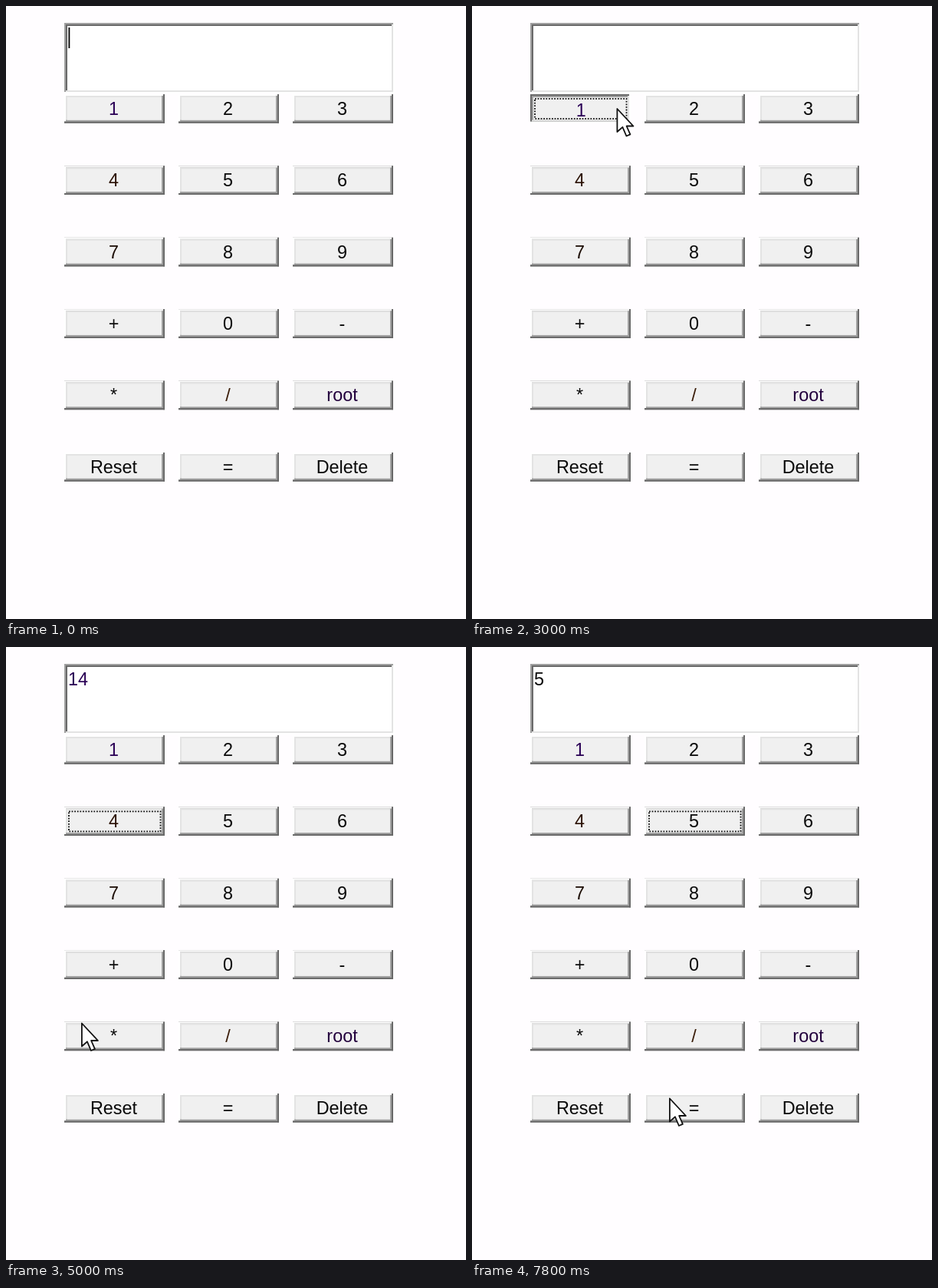
Animation of 600x799 px, one loop 8 s. Source, as an HTML page:

```html
<!DOCTYPE html>
<html lang="en">
<head>
<meta charset="utf-8">
<title>Calculator</title>
<style>
  html, body { margin: 0; width: 100%; height: 100%; overflow: hidden; background: #fffdff; }
  svg { display: block; width: 100%; height: 100%; }
  text { font: 23.4px "Liberation Sans", Arial, sans-serif; fill: #0a0a0a; }
  .key text { text-anchor: middle; }
  .white { fill: #fff; }
  .light { fill: #e3e3e3; }
  .mid { fill: #a0a0a0; }
  .dark { fill: #696969; }
  .face { fill: #f0f0f0; }
  .ring { fill: none; stroke: #111; stroke-width: 1.8; stroke-dasharray: 1.8; visibility: hidden; }
  .focus .ring { visibility: visible; }
  .sunken, .pressed .raised { display: none; }
  .pressed .sunken { display: inline; }
  .pressed text { transform: translate(1.8px, 1.8px); }
</style>
</head>
<body>
<svg viewBox="0 0 600 799">
  <g id="field"></g>
  <rect id="caret" x="81.5" y="28" width="1.8" height="27"/>
  <text id="display" x="81" y="50"></text>
  <g id="keys"></g>
  <path id="pointer" d="M0 0V30L7 23.8L12 35.5L17 33.4L12.2 22.5H21Z"
        fill="#fff" stroke="#111" stroke-width="1.8" stroke-linejoin="round"/>
</svg>
<script>
const LOOP = 8000, STEP = 200;
const LABELS = ['1', '2', '3', '4', '5', '6', '7', '8', '9',
  '+', '0', '-', '*', '/', 'root', 'Reset', '=', 'Delete'];
const TINTS = { 1: '#2a0055', 4: '#2b1206', 7: '#1c0d05', '/': '#3a1c08', root: '#22003c' };

const $ = id => document.getElementById(id);

const rect = (cls, x, y, w, h) =>
  `<rect class="${cls}" x="${x}" y="${y}" width="${w}" height="${h}"/>`;

// Two-pixel outer and inner edges around a face.
function bevel(w, h, [outerTop, innerTop, innerEnd, outerEnd], face) {
  return rect(outerEnd, 0, 0, w, h) +
    rect(outerTop, 0, 0, w - 2, h - 2) +
    rect(innerEnd, 2, 2, w - 4, h - 4) +
    rect(innerTop, 2, 2, w - 6, h - 6) +
    rect(face, 4, 4, w - 8, h - 8);
}

function keyMarkup(label, i) {
  const x = 76 + (i % 3) * 149;
  const y = 115 + Math.floor(i / 3) * 93.4;
  return `<g class="key" transform="translate(${x} ${y.toFixed(1)})">
    <g class="raised">${bevel(131, 37.6, ['white', 'light', 'mid', 'dark'], 'face')}
      ${rect('dark', 0, 35.6, 131, 2)}${rect('dark', 129, 0, 2, 37.6)}</g>
    <g class="sunken">${bevel(131, 37.6, ['dark', 'mid', 'light', 'white'], 'face')}</g>
    <rect class="ring" x="6" y="5.9" width="119.5" height="26"/>
    <text x="64.5" y="26.8" style="fill:${TINTS[label] || '#0a0a0a'}">${label}</text>
  </g>`;
}

$('field').setAttribute('transform', 'translate(76 22)');
$('field').innerHTML = bevel(431, 92, ['mid', 'dark', 'light', 'white'], 'white');
$('keys').innerHTML = LABELS.map(keyMarkup).join('');
const keys = [...$('keys').children];

// Pointer stops: time, x, y.
const PATH = [
  [2000, 222, 168], [2400, 190, 131], [3200, 188, 133], [3600, 147, 212],
  [3800, 147, 227], [4400, 147, 227], [4600, 73, 350], [4800, 88, 470],
  [5200, 108, 508], [5800, 111, 511], [6200, 113, 509], [6600, 248, 224],
  [7000, 250, 226], [7200, 254, 400], [7400, 258, 591], [7800, 257, 587]
];
// Clicks: press time, key, text shown after release.
const CLICKS = [[3000, '1', '1'], [4000, '4', '14'], [6000, '*', ''], [6800, '5', '5']];

function pointerAt(t) {
  const next = PATH.findIndex(p => p[0] > t);
  if (next < 0) return PATH[PATH.length - 1].slice(1);
  const [t0, x0, y0] = PATH[next - 1], [t1, x1, y1] = PATH[next];
  const k = (t - t0) / (t1 - t0);
  return [x0 + (x1 - x0) * k, y0 + (y1 - y0) * k];
}

function draw(t) {
  const begun = CLICKS.filter(c => c[0] <= t);
  const released = CLICKS.filter(c => c[0] + STEP <= t);
  const active = begun[begun.length - 1];
  const result = released[released.length - 1];

  keys.forEach((key, i) => {
    const focused = !!active && LABELS[i] === active[1];
    key.classList.toggle('focus', focused);
    key.classList.toggle('pressed', focused && active !== result);
  });
  const shown = result ? result[2] : '';
  $('display').textContent = shown;
  $('display').style.fill = shown[0] === '1' ? TINTS[1] : '#0a0a0a';
  $('caret').style.display = active ? 'none' : '';

  const visible = t >= PATH[0][0];
  $('pointer').style.display = visible ? '' : 'none';
  if (visible) {
    const [x, y] = pointerAt(t);
    $('pointer').setAttribute('transform', `translate(${x + 0.9} ${y + 1.5})`);
  }
}

let last = -1;
function tick() {
  const t = Math.floor(performance.now() % LOOP / STEP) * STEP;
  if (t !== last) draw(last = t);
  requestAnimationFrame(tick);
}
tick();
</script>
</body>
</html>
```
